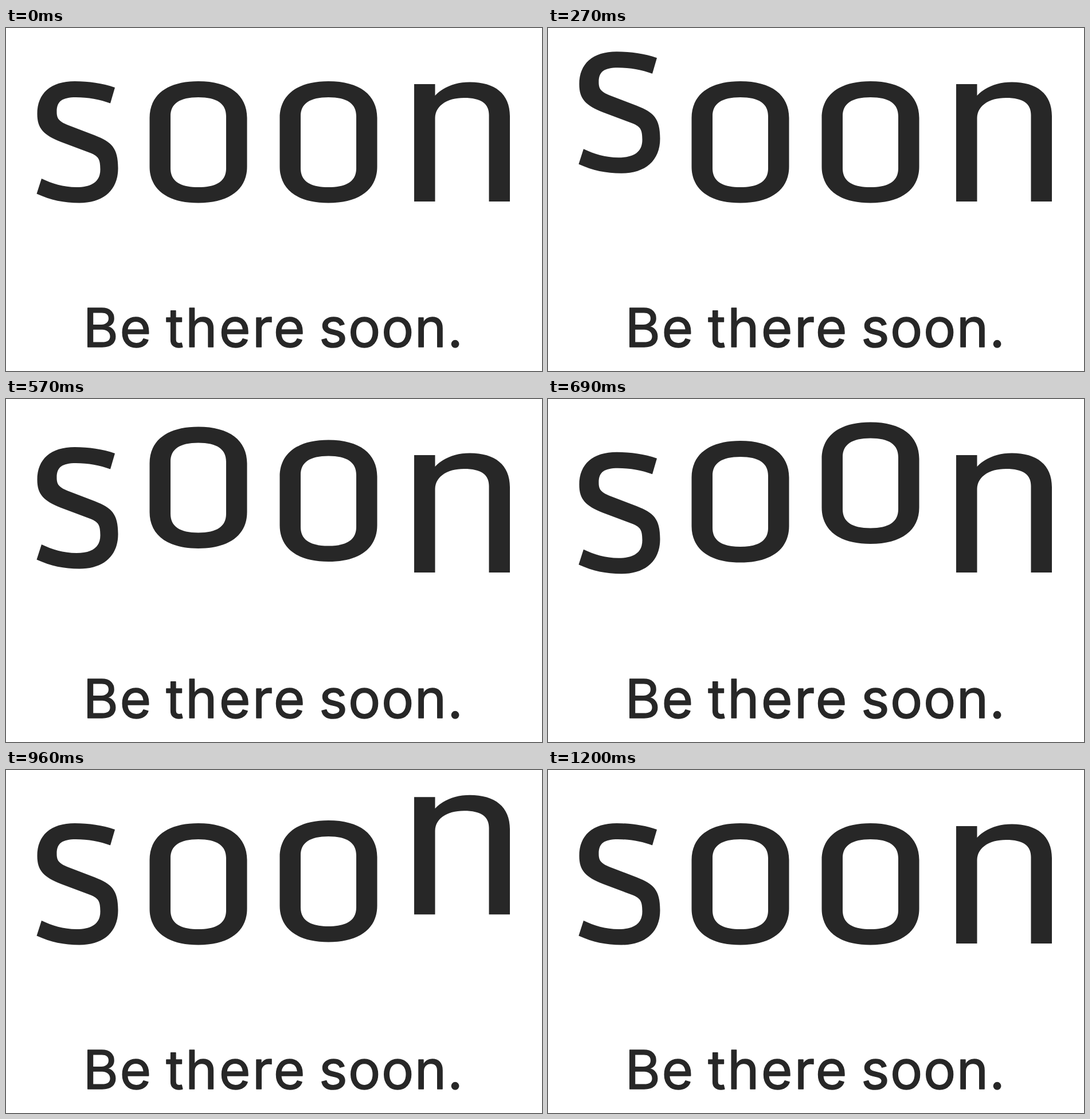
Write an HTML page that moves like this. It is 935x599 px and loops after 3930 ms.

```html
<!DOCTYPE html>
<html lang="en">
<head>
<meta charset="utf-8">
<title>Be there soon</title>
<style>
  html, body { margin: 0; width: 100%; height: 100%; overflow: hidden; background: #fff; }
  svg { display: block; width: 100%; height: 100%; }
  text {
    font: 400 94px Inter, Roboto, sans-serif;
    font-optical-sizing: none;
    stroke: #272727;
    stroke-width: 1.5;
    stroke-linejoin: round;
  }
</style>
</head>
<body>
<svg viewBox="0 0 935 599" fill="#272727">
  <defs>
    <path id="o" fill-rule="evenodd" d="
      M250.5 157 C250.5 117 281 93 335.5 93 S420.5 117 420.5 157
      V242 C420.5 281.5 390 305.5 335.5 305.5 S250.5 281.5 250.5 242 Z
      M287 154 V245 C287 267 303 278 335.5 278 S384 267 384 245
      V154 C384 132 368 121 335.5 121 S287 132 287 154 Z"/>
  </defs>
  <g class="letter">
    <path d="
      M190 104 C168 96.500 145 93 120 93 C78 93 54.500 114 54.500 150
      C54.500 176 66 187 96 199 L148 218.500 C161 224 164.500 229 164.500 247
      C164.500 268 150 278 123 278 C100 278 80 271.500 62 263 L53.500 289.500
      C78 300.500 101 305.500 128 305.500 C170 305.500 195.500 283 195.500 245
      C195.500 209 184 199 155 187.500 L108 169.500 C92 163 88.500 158 88.500 146
      C88.500 128 98 121 122 121 C143 121 164 125 182 131.500 Z"/>
  </g>
  <g class="letter"><use href="#o"/></g>
  <g class="letter"><use href="#o" x="227"/></g>
  <g class="letter">
    <path d="
      M712 98 H748.500 V118 C763 103 784 94.500 809 94.500
      C853 94.500 879 115 879 154 V303 H842.500 V152
      C842.500 132 829 122 799 122 C770 122 749 135 748.500 157 V303 H712 Z"/>
  </g>
  <text y="556.5"><tspan x="134.5" letter-spacing="2.5">Be</tspan> <tspan x="279" letter-spacing="3.2">there</tspan> <tspan x="546" letter-spacing="1.5">soon.</tspan></text>
</svg>
<script>
  const LOOP = 3930, STEP = 30, HEIGHT = 53;
  const letters = document.querySelectorAll('.letter');

  // Start, peak and landing time of each hop, in ms
  const hops = [
    [25, 215, 712],
    [285, 458, 863],
    [495, 664, 1041],
    [745, 920, 1200]
  ];

  const bezier = (a, b, s) => 3 * a * s * (1 - s) ** 2 + 3 * b * s * s * (1 - s) + s ** 3;

  // Same curve as the CSS ease-in-out
  function ease(u) {
    if (u <= 0) return 0;
    if (u >= 1) return 1;
    let lo = 0, hi = 1;
    for (let i = 0; i < 20; i++) {
      const mid = (lo + hi) / 2;
      if (bezier(0.42, 0.58, mid) < u) lo = mid; else hi = mid;
    }
    return bezier(0, 1, lo);
  }

  function lift(t, [start, peak, end]) {
    return HEIGHT * (t < peak
      ? ease((t - start) / (peak - start))
      : 1 - ease((t - peak) / (end - peak)));
  }

  function draw(time) {
    const t = Math.floor((time % LOOP) / STEP) * STEP;
    letters.forEach((el, i) => {
      el.setAttribute('transform', `translate(0 ${-lift(t, hops[i]).toFixed(2)})`);
    });
  }

  const begin = performance.now();
  function tick() {
    draw(performance.now() - begin);
    requestAnimationFrame(tick);
  }
  tick();
</script>
</body>
</html>
```
